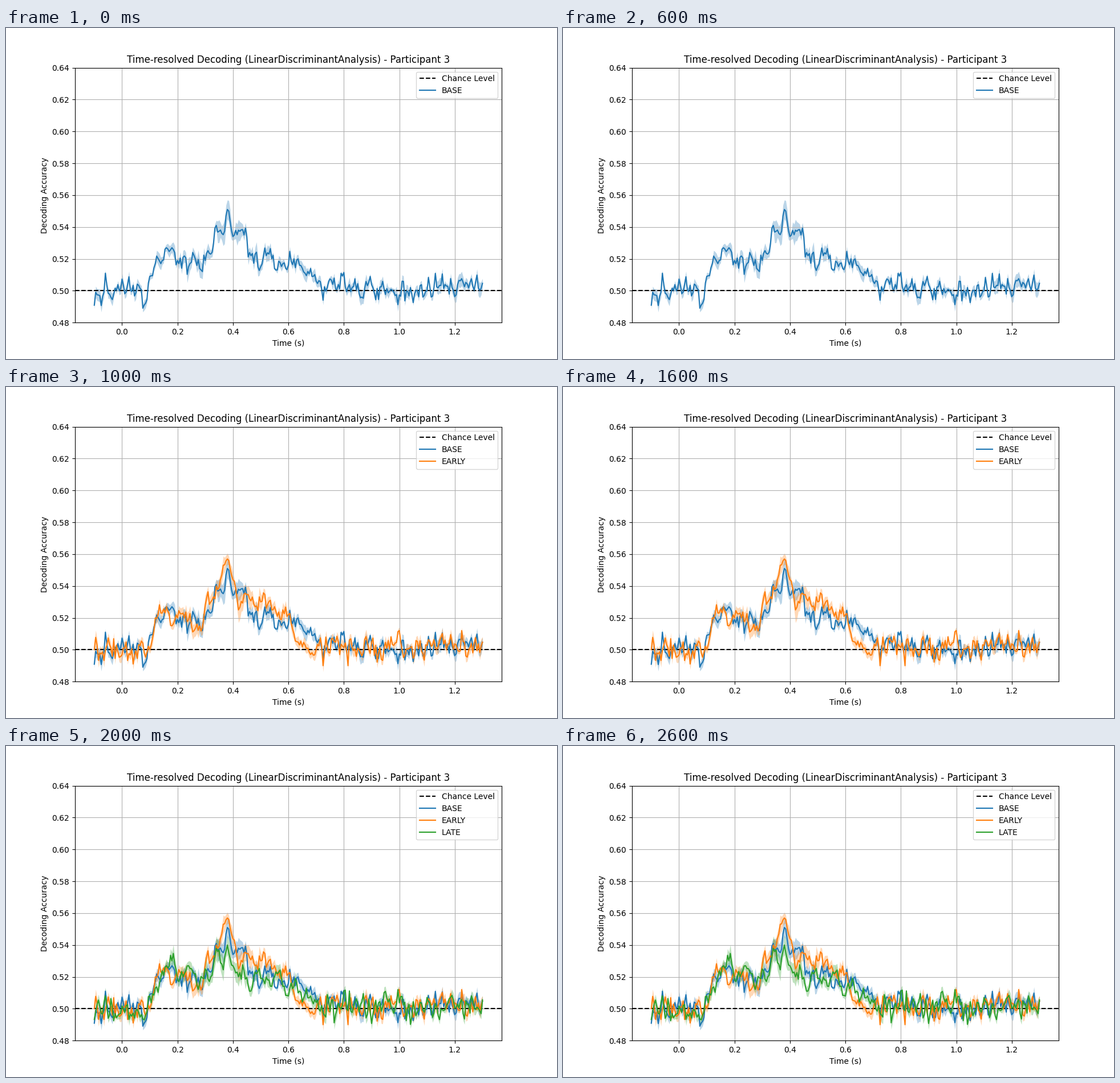
Write a matplotlib script that moves like this. It is 966 px wide and 580 px high and loops after 3000 ms.

```python
import numpy as np
import matplotlib.pyplot as plt
from matplotlib.animation import FuncAnimation

# Response, in thousandths above chance, every 20 ms from 80 ms on
RESPONSES = {
    "BASE": [-9, 9, 17, 17, 27, 27, 19, 21, 15, 22, 14, 19, 23, 41, 36, 51,
             34, 38, 35, 24, 23, 15, 22, 20, 13, 17, 16, 20, 16, 11, 14, 6, 1],
    "EARLY": [-2, 0, 20, 23, 27, 15, 20, 23, 19, 12, 15, 28, 30, 40, 47, 57,
              44, 25, 35, 32, 27, 30, 26, 25, 21, 25, 22, 10, 3, 3, -3, 0, 2],
    "LATE": [-7, 8, 13, 20, 27, 30, 18, 20, 27, 22, 16, 25, 20, 38, 28, 40,
             27, 20, 24, 11, 23, 19, 20, 14, 22, 14, 8, 14, 11, 9, 8, 4, 2],
}
CHANCE = 0.5
MS = np.arange(-100, 1301, 5)
KNOTS = np.arange(80, 721, 20)


def make_curve(response, seed):
    """Return the mean accuracy and its spread at every sample."""
    rng = np.random.default_rng(seed)
    noise = np.convolve(rng.normal(0, 4.4, MS.size + 2), [0.2, 1, 0.2], "valid")
    noise = np.clip(noise, -11, 11)
    active = (MS >= KNOTS[0]) & (MS <= KNOTS[-1])
    noise[active] *= 0.7
    noise[np.isin(MS, KNOTS)] = 0
    mean = np.interp(MS, KNOTS, response, left=0, right=1) + noise
    spread = np.convolve(rng.uniform(0.5, 6, MS.size + 2),
                         [0.25, 0.5, 0.25], "valid")
    spread *= 0.95 + 0.7 * np.exp(-((MS - 380) / 130) ** 2)
    return CHANCE + mean / 1000, spread / 1000


fig, ax = plt.subplots(figsize=(9.66, 5.8), dpi=100)
ax.set(xlim=(-0.17, 1.37), ylim=(0.48, 0.64),
       xlabel="Time (s)", ylabel="Decoding Accuracy",
       title="Time-resolved Decoding (LinearDiscriminantAnalysis)"
             " - Participant 3")
ax.grid(True)
chance = ax.axhline(CHANCE, color="black", ls="--", label="Chance Level")

lines, bands = [], []
for n, (label, response) in enumerate(RESPONSES.items()):
    mean, spread = make_curve(response, n + 3)
    lines += ax.plot(MS / 1000, mean, color=f"C{n}", label=label)
    bands.append(ax.fill_between(MS / 1000, mean - spread, mean + spread,
                                 color=f"C{n}", alpha=0.3, lw=0))


def update(i):
    for n, (line, band) in enumerate(zip(lines, bands)):
        line.set_visible(n <= i)
        band.set_visible(n <= i)
    ax.legend(handles=[chance] + lines[:i + 1], loc="upper right")
    return lines + bands


anim = FuncAnimation(fig, update, frames=len(lines), interval=1000,
                     repeat=True, repeat_delay=0)
plt.show()
```
